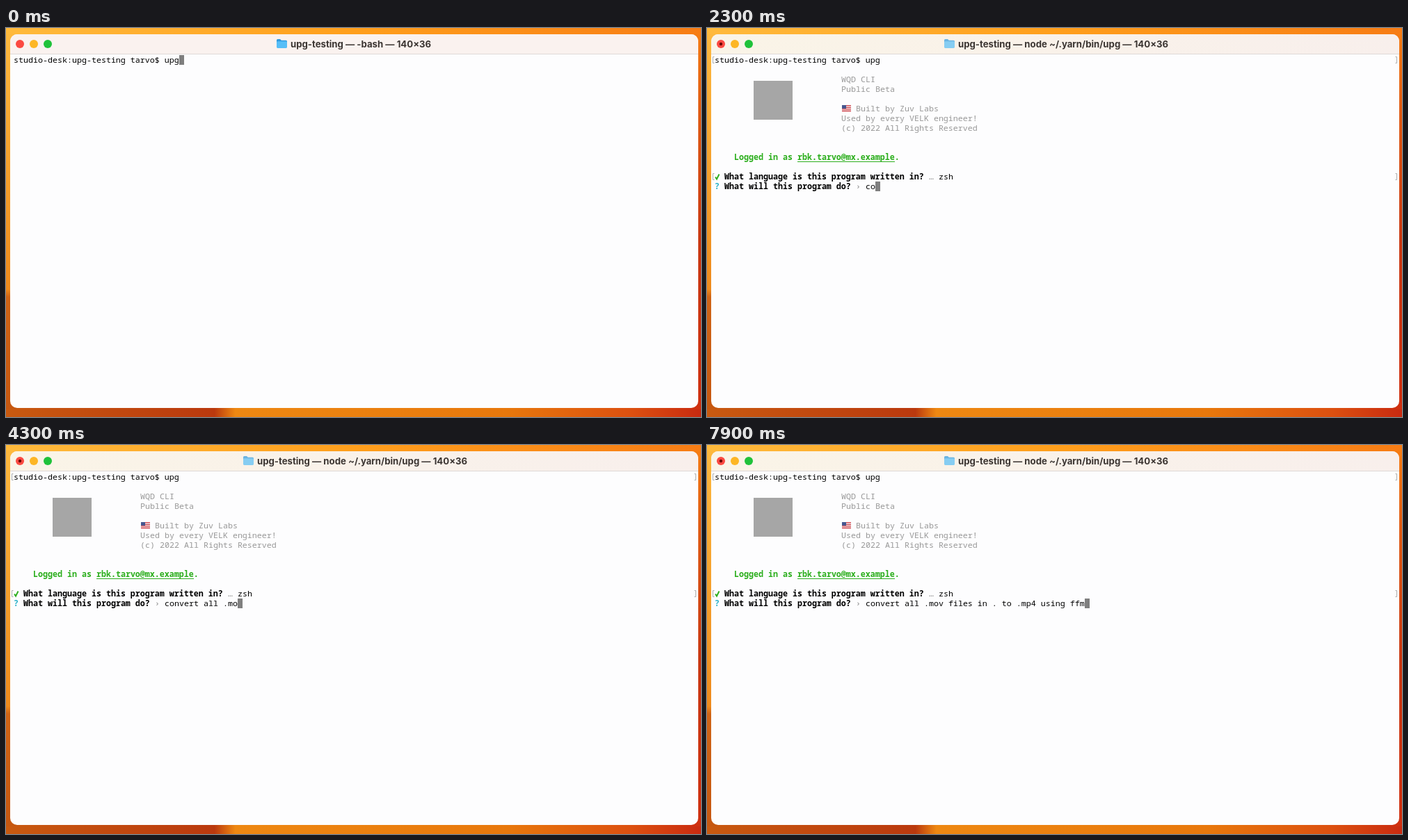
An HTML page that plays this animation: 999x560 px, repeating every 8000 ms.

```html
<!DOCTYPE html>
<html lang="en">
<head>
<meta charset="utf-8">
<title>Terminal session</title>
<style>
html, body { margin: 0; width: 100%; height: 100%; overflow: hidden; background: #e8780a; }
svg { display: block; width: 999px; height: 560px; }
text { white-space: pre; font: 11.667px "Noto Sans Mono", "DejaVu Sans Mono", monospace; fill: #000; }
.title { font: 700 13.2px Inter, "Open Sans", sans-serif; fill: #3b3532; }
.b { font-weight: 700; }
.grey { fill: #989898; }
.dim { fill: #858585; }
.green { fill: #2bae1c; }
.cyan { fill: #2fb4cb; }
.mark { fill: none; stroke: #adadad; }
</style>
</head>
<body>
<svg viewBox="0 0 999 560">
  <defs>
    <linearGradient id="top">
      <stop stop-color="#ffba3c"/><stop offset=".5" stop-color="#ff9f1c"/><stop offset="1" stop-color="#f77c14"/>
    </linearGradient>
    <linearGradient id="left" x2="0" y2="1">
      <stop stop-color="#fdb83e"/><stop offset=".68" stop-color="#ee8a1c"/>
      <stop offset=".7" stop-color="#cf6416"/><stop offset="1" stop-color="#c65710"/>
    </linearGradient>
    <linearGradient id="right" x2="0" y2="1">
      <stop stop-color="#f57c14"/><stop offset=".2" stop-color="#e05c14"/>
      <stop offset=".55" stop-color="#c93812"/><stop offset="1" stop-color="#cf3010"/>
    </linearGradient>
    <linearGradient id="bottom">
      <stop stop-color="#c95a10"/><stop offset=".3" stop-color="#ba390e"/>
      <stop offset=".33" stop-color="#ee8812"/><stop offset=".72" stop-color="#e8780c"/>
      <stop offset=".9" stop-color="#dc5010"/><stop offset="1" stop-color="#c92a10"/>
    </linearGradient>
    <linearGradient id="bar">
      <stop stop-color="#faf4e7"/><stop offset="1" stop-color="#f8efec"/>
    </linearGradient>
  </defs>

  <rect width="999" height="20" fill="url(#top)"/>
  <rect y="540" width="999" height="20" fill="url(#bottom)"/>
  <rect y="9" width="16" height="540" fill="url(#left)"/>
  <rect x="983" y="9" width="16" height="540" fill="url(#right)"/>

  <rect x="6" y="9" width="989" height="538" rx="10" fill="#fdfdfe"/>
  <path id="titlebar" d="M6 37.5V19a10 10 0 0 1 10-10H985a10 10 0 0 1 10 10V37.5z"/>
  <path d="M6 37.5H995" stroke="#dfd9d7"/>
  <circle cx="20" cy="23" r="6" fill="#fb4a42"/>
  <circle cx="40" cy="23" r="6" fill="#fdb625"/>
  <circle cx="60" cy="23" r="6" fill="#1fc23a"/>

  <g id="heading">
    <g id="folder">
      <path d="M0 17.5q0-1.5 1.5-1.5H5l1.8 1.7H13.5q1.5 0 1.5 1.5V22H0z" fill="#2f9be0"/>
      <rect y="19.2" width="15" height="9.8" rx="1.4" fill="#56bef7"/>
    </g>
    <text id="title" class="title" x="20" y="27.5"></text>
  </g>

  <text x="11" y="50">studio-desk:upg-testing tarvo$ upg</text>

  <g id="running">
    <circle cx="20" cy="23" r="2.2" fill="#6d0805"/>
    <path class="mark" d="M10.5 41.5H8.5V50.5H10.5M989.5 41.5H991.5V50.5H989.5"/>
  </g>

  <g id="banner">
    <rect x="67" y="76" width="56" height="56" fill="#a6a6a6"/>
    <g class="grey">
      <text class="grey" x="193" y="78">WQD CLI</text>
      <text class="grey" x="193" y="92">Public Beta</text>
      <text class="grey" x="214" y="120">Built by Zuv Labs</text>
      <text class="grey" x="193" y="134">Used by every VELK engineer!</text>
      <text class="grey" x="193" y="148">(c) 2022 All Rights Reserved</text>
    </g>
    <rect x="194" y="111" width="13" height="9" fill="#f3e9e9"/>
    <path d="M194 111.7h13m-13 2.6h13m-13 2.6h13m-13 2.6h13" stroke="#d0444c" stroke-width="1.3"/>
    <rect x="194" y="111" width="6" height="5" fill="#46578f"/>
    <text class="b green" x="39" y="190">Logged in as rbk.tarvo@mx.example.</text>
    <path d="M130 192.5H270" stroke="#2bae1c"/>
    <text class="b" x="25" y="218">What language is this program written in?</text>
    <text id="arrow" class="dim" x="319" y="218"></text>
    <text id="answer" x="333" y="218">zsh</text>
    <text id="ask" class="b cyan" x="11" y="218">?</text>
  </g>

  <g id="second">
    <path class="mark" d="M10.5 209.5H8.5V218.5H10.5M989.5 209.5H991.5V218.5H989.5"/>
    <path d="M12 214.5L14 217.5L17.5 210.5" fill="none" stroke="#2bae1c" stroke-width="1.9"/>
    <text class="b cyan" x="11" y="232">?</text>
    <text class="b" x="25" y="232">What will this program do?</text>
    <text class="dim" x="214" y="232">›</text>
    <text id="typed" x="228" y="232"></text>
  </g>
  <rect id="cursor" width="7" height="14" fill="#7f7f7f"/>
</svg>
<script>
const LOOP = 8000, RUN = 100, BANNER = 1100, NEXT = 1700;
const SENTENCE = "convert all .mov files in . to .mp4 using ffm";
// [time, characters typed]
const KEYS = [[2100, 0], [2300, 2], [3100, 10], [4300, 15], [5400, 27], [7900, 45]];
const $ = id => document.getElementById(id);
const show = (id, on) => $(id).setAttribute("display", on ? "inline" : "none");

function typedCount(t) {
  if (t <= KEYS[0][0]) return 0;
  const i = KEYS.findIndex(k => k[0] > t);
  if (i < 0) return SENTENCE.length;
  const [t0, n0] = KEYS[i - 1], [t1, n1] = KEYS[i];
  return Math.floor(n0 + (n1 - n0) * (t - t0) / (t1 - t0) + 1e-6);
}

function placeCursor(col, row) {
  $("cursor").setAttribute("x", 11 + col * 7);
  $("cursor").setAttribute("y", 39 + row * 14);
}

function draw(t) {
  const running = t >= RUN, banner = t >= BANNER, second = t >= NEXT;
  const count = typedCount(t);

  $("title").textContent = `upg-testing — ${running ? "node ~/.yarn/bin/upg" : "-bash"} — 140×36`;
  $("heading").setAttribute("transform", `translate(${running ? 341 : 389} 0)`);
  $("folder").setAttribute("opacity", running ? .7 : 1);
  $("titlebar").setAttribute("fill", running ? "url(#bar)" : "#faf2ef");

  show("running", running);
  show("banner", banner);
  show("second", second);
  show("ask", !second);
  $("arrow").textContent = second ? "…" : "›";
  $("answer").setAttribute("class", second ? "" : "dim");
  $("typed").textContent = SENTENCE.slice(0, count);

  if (second) placeCursor(31 + count, 13);
  else if (banner) placeCursor(49, 12);
  else if (running) placeCursor(0, 1);
  else placeCursor(34, 0);
}

const start = performance.now();
function tick() {
  draw((performance.now() - start) % LOOP);
  requestAnimationFrame(tick);
}
tick();
</script>
</body>
</html>
```
